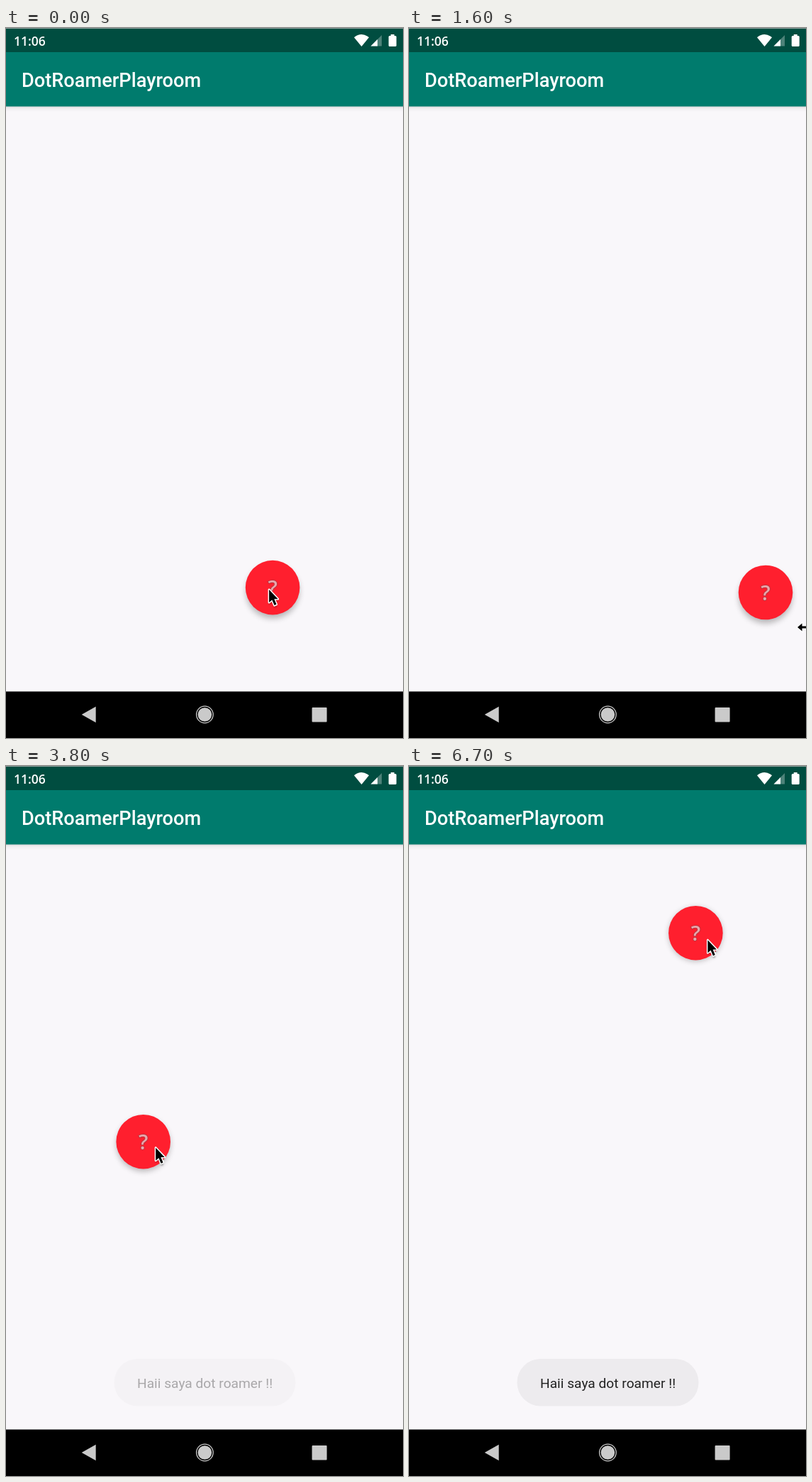
Animation of 560 by 1000 pixels, one loop 6.8 s. Source, as an HTML page:

```html
<!DOCTYPE html>
<html lang="id">
<head>
<meta charset="utf-8">
<title>Draggable button</title>
<style>
  html, body { margin: 0; width: 100%; height: 100%; overflow: hidden; background: #f9f7fa; }
  svg { display: block; width: 100vw; height: 100vh; }
  text { font-family: Roboto, sans-serif; }
  .mark { font-family: 'Open Sans', sans-serif; font-weight: 600; }
</style>
</head>
<body>
<svg viewBox="0 0 560 1000">
  <defs>
    <linearGradient id="barShade" x2="0" y2="1">
      <stop offset="0" stop-color="#000" stop-opacity=".14"/>
      <stop offset=".4" stop-color="#000" stop-opacity=".04"/>
      <stop offset="1" stop-color="#000" stop-opacity="0"/>
    </linearGradient>
    <filter id="soft" x="-40%" y="-40%" width="180%" height="180%">
      <feGaussianBlur stdDeviation="4.5"/>
    </filter>
    <filter id="faint" x="-50%" y="-50%" width="200%" height="200%">
      <feGaussianBlur stdDeviation="1.2"/>
    </filter>
  </defs>

  <rect width="560" height="1000" fill="#f9f7fa"/>

  <g id="fab">
    <circle id="shade" r="37.5" opacity=".27" filter="url(#soft)"/>
    <circle r="38.3" fill="#ff1f2e"/>
    <text class="mark" y="10.5" text-anchor="middle" font-size="29.5" fill="#e9a6ab"
      stroke="#a8333c" stroke-width="1.5" paint-order="stroke">?</text>
  </g>

  <rect y="110" width="560" height="8" fill="url(#barShade)"/>
  <rect y="33" width="560" height="77.5" fill="#007b6d"/>
  <rect width="560" height="34" fill="#004d40"/>
  <rect width="560" height="1" fill="#8f9f9c"/>
  <text x="22" y="83" font-size="27.2" font-weight="500" fill="#fff">DotRoamerPlayroom</text>

  <g fill="#fff">
    <text class="mark" x="11" y="24.7" font-size="17.5">11:06</text>
    <path d="M491 13.2Q501.5 5 512 13.2L501.5 26Z"/>
    <path d="M514.5 25.5H530V10Z" opacity=".3"/>
    <path d="M514.5 25.5H524V16Z"/>
    <rect x="539.7" y="11" width="11" height="15" rx="1.5"/>
    <rect x="542.7" y="9" width="5" height="3"/>
  </g>

  <g id="toast">
    <rect x="152.5" y="835" width="256" height="66.5" rx="33" fill="#edebee"/>
    <text x="185" y="876" font-size="19.2" fill="#222">Haii saya dot roamer !!</text>
  </g>

  <rect y="934.5" width="560" height="65.5"/>
  <g fill="#cacaca">
    <path d="M106.7 967L126.700 955.800V978.200Z"/>
    <circle cx="280.4" cy="967" r="9.8"/>
    <circle cx="280.4" cy="967" r="11.8" fill="none" stroke="#cacaca" stroke-width="1.3"/>
    <rect x="431.6" y="957" width="21" height="20.6" rx="1"/>
  </g>

  <g id="pointer">
    <g id="arrow">
      <path d="M0 1V20L4.300 16 8 24 11.200 22.600 7.800 14.800H13.300Z" transform="translate(0 1.5)" opacity=".3" filter="url(#faint)"/>
      <path d="M0 0V18L4.200 14.300 7.500 22 10.400 20.700 7.200 13.200H12.500Z"
        stroke="#fff" stroke-width="3" stroke-linejoin="round" paint-order="stroke"/>
    </g>
    <path id="resize" d="M-12 0L-5.500-5.500V-1.500H5.500V-5.500L12 0 5.500 5.500V1.500H-5.500V5.500Z"
      stroke="#fff" stroke-width="2.5" paint-order="stroke"/>
  </g>
</svg>
<script>
const LOOP = 6800, STEP = 100;
const $ = id => document.getElementById(id);

const clamp = u => Math.max(0, Math.min(1, u));
const linear = u => u;
const easeIn = u => u * u;
const easeOut = u => u * (2 - u);
const smooth = u => u * u * (3 - 2 * u);

const move = (start, end, x, y, ease = smooth) => ({ start, end, x, y, ease });

// Where the button is dragged to; it rests between moves
const drags = [
  move(0, 500, 75.5, 159),
  move(500, 800, 39, 149, easeOut),
  move(900, 1600, 503, 795),
  move(1600, 2000, 522, 858, easeOut),
  move(2200, 2800, 342.5, 690, easeIn),
  move(2800, 3000, 193.7, 529.2, linear),
  move(5100, 5200, 198, 529.2, linear),
  move(5200, 5800, 404.4, 235.2)
];

// The pointer's offset from the button, which lags behind it
const leads = [
  move(0, 500, 6.5, -19.5),
  move(900, 1600, 57, 49),
  move(2000, 2800, -57, -54),
  move(2800, 3100, -2, 11),
  move(3200, 3400, 17.5, 8.5),
  move(4000, 5200, 30.5, 3, easeOut),
  move(6000, 6500, 17, 10)
];

function follow(x, y, moves, t) {
  for (const m of moves) {
    const u = m.ease(clamp((t - m.start) / (m.end - m.start)));
    x += (m.x - x) * u;
    y += (m.y - y) * u;
  }
  return [x, y];
}

const place = (id, x, y) => $(id).setAttribute('transform', `translate(${x.toFixed(2)} ${y.toFixed(2)})`);
const fade = (id, value) => $(id).setAttribute('opacity', value);

function draw(now) {
  const t = Math.floor(now % LOOP / STEP) * STEP;
  const [x, y] = follow(376.1, 788.1, drags, t);
  const [dx, dy] = follow(-5, 3, leads, t);
  place('fab', x, y);
  place('pointer', x + dx, y + dy);
  $('shade').setAttribute('cy', y * 0.0075);

  const atEdge = x + dx > 550;
  fade('arrow', atEdge ? 0 : 1);
  fade('resize', atEdge ? 1 : 0);
  fade('toast', clamp((t - 3700) / 270));
}

const start = performance.now();
function tick() {
  draw(performance.now() - start);
  requestAnimationFrame(tick);
}
tick();
</script>
</body>
</html>
```
